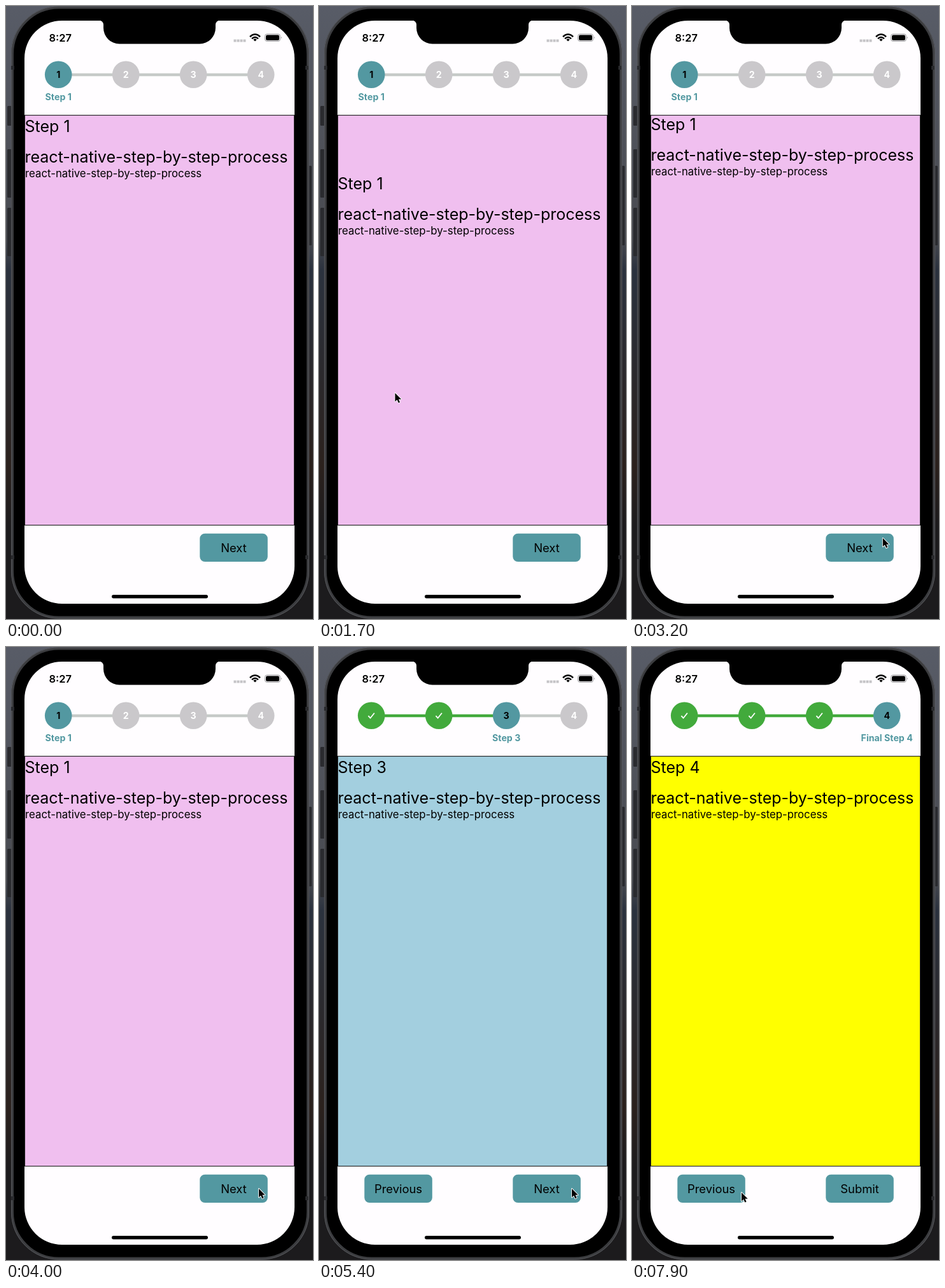
Animation of 482x963 px, one loop 8 s. Source, as an HTML page:

```html
<!DOCTYPE html>
<html lang="en">
<head>
<meta charset="utf-8">
<title>Step by step process</title>
<style>
  html, body { margin: 0; width: 100%; height: 100%; overflow: hidden; background: #1c1c20; }
  svg { display: block; width: 100vw; height: 100vh; font-family: Inter, Roboto, sans-serif; }
  .mid { text-anchor: middle; }
  .bold { font-weight: 700; font-size: 14.2px; }
  .title { font-size: 25px; }
  .small { font-size: 16.8px; }
  .button { font-size: 18.4px; }
</style>
</head>
<body>
<svg viewBox="0 0 482 963">
  <defs>
    <linearGradient id="desk" x2="0" y2="1">
      <stop offset="0" stop-color="#585c67"/>
      <stop offset=".38" stop-color="#484a50"/>
      <stop offset=".43" stop-color="#2b323e"/>
      <stop offset=".75" stop-color="#2b211d"/>
      <stop offset=".85" stop-color="#1c1b1d"/>
    </linearGradient>
    <clipPath id="panel"><rect x="30" y="172" width="422" height="643"/></clipPath>
  </defs>

  <rect width="482" height="963" fill="url(#desk)"/>
  <g fill="#2a2b2f">
    <rect x="2" y="157" width="7" height="31" rx="1.5"/>
    <rect x="2" y="225" width="7" height="76" rx="1.5"/>
    <rect x="2" y="317" width="7" height="76" rx="1.5"/>
    <rect x="474" y="251" width="6" height="125" rx="1.5"/>
  </g>
  <rect x="10" y="2.5" width="464" height="958" rx="73" stroke="#3b3c3f" stroke-width="4"/>
  <rect x="8.5" y="1" width="467" height="961" rx="74" fill="none" stroke="#55565a"/>
  <path d="M8 97h5M470 97h5M8 866h5M470 866h5" stroke="#292a2d" stroke-width="6"/>
  <rect x="29" y="23" width="424" height="916" rx="59" fill="#fffdff"/>
  <path d="M146 22.5a7 7 0 0 1 7 7V34.5a25 25 0 0 0 25 25H304a25 25 0 0 0 25 -25V29.5a7 7 0 0 1 7 -7Z"/>

  <text x="67.5" y="56" font-size="16.5" font-weight="600">8:27</text>
  <path d="M357.5 54.5h19" stroke="#c4c3c6" stroke-width="4" stroke-dasharray="4 1"/>
  <g fill="none" stroke="#000" stroke-width="2.5">
    <path d="M383 48.3Q391 40.8 399 48.3M386 51.3Q391 46.7 396 51.3"/>
    <path d="M388.3 52.7Q391 50.5 393.7 52.7L391 55.6Z" fill="#000" stroke="none"/>
  </g>
  <rect x="406.5" y="44" width="24" height="11.5" rx="3.5" fill="none" stroke="#9b9a9d"/>
  <rect x="408" y="45.5" width="21" height="8.5" rx="2.2"/>
  <path d="M432 48q2 1.7 0 3.5z" fill="#9b9a9d"/>

  <g id="steps"></g>

  <rect id="box" x="29.5" y="171.6" width="423" height="644" stroke="#1c1c1c" stroke-width="1.1"/>
  <g clip-path="url(#panel)">
    <g id="content">
      <text id="heading" class="title" x="29.5" y="198"></text>
      <text class="title" x="29.5" y="246">react-native-step-by-step-process</text>
      <text class="small" x="30" y="269.3">react-native-step-by-step-process</text>
    </g>
  </g>

  <g id="previous" class="button mid">
    <rect x="71.3" y="828.7" width="106.5" height="44.3" rx="8" fill="#5398a1"/>
    <text x="124.5" y="858">Previous</text>
  </g>
  <g id="next" class="button mid">
    <rect x="304.3" y="828.7" width="106.5" height="44.3" rx="8" fill="#5398a1"/>
    <text id="nextLabel" x="357.5" y="858"></text>
  </g>
  <rect x="166" y="925" width="151" height="5.5" rx="2.7"/>
  <path id="cursor" d="M0 0V13.5L3.1 10.7L5.3 15.5L7.6 14.5L5.5 9.8H9.7Z"
        stroke="#fff" stroke-width="1.8" stroke-linejoin="round" paint-order="stroke"/>
</svg>
<script>
const LOOP = 8000, TICK = 100;
const TEAL = '#5398a1', GREEN = '#42aa3c', GRAY = '#cac8cb';
const PANEL_COLORS = ['#f0bfef', '#86ea86', '#a3cfdf', '#ffff00'];
const STEP_CHANGES = [4700, 5200, 6700];

const PANEL_HEIGHT = 644, GRAB_TIME = 1000, RELEASE_TIME = 2700, SETTLE = 355;
const ENTRY = { time: 300, x: 30, y: 330 };
const GRAB = { x: 104, y: 421, from: 300, to: 700 };
const LEGS = [
  GRAB,
  { x: 126, y: 687, from: GRAB_TIME, to: 2400, power: 1.75 },
  { x: 300, y: 395, from: 2400, to: RELEASE_TIME },
  { x: 397, y: 851, from: RELEASE_TIME, to: 3600, power: 4.2 },
  { x: 399, y: 854, from: 6100, to: 6200 },
  { x: 160, y: 861, from: 7400, to: 7800 },
  { x: 172, y: 857, from: 7800, to: 7900 }
];

const $ = id => document.getElementById(id);
const show = (node, on) => node.setAttribute('visibility', on ? 'visible' : 'hidden');
const progress = (t, from, to) => Math.min(1, Math.max(0, (t - from) / (to - from)));
const easeOut = (k, power = 2) => 1 - (1 - k) ** power;

function cursorAt(t) {
  return LEGS.reduce((pos, leg) => {
    const k = easeOut(progress(t, leg.from, leg.to), leg.power);
    return { x: pos.x + (leg.x - pos.x) * k, y: pos.y + (leg.y - pos.y) * k };
  }, ENTRY);
}

// Overscroll resists the drag, then decays after release.
function scrollAt(t) {
  if (t < GRAB_TIME) return 0;
  const pull = cursorAt(Math.min(t, RELEASE_TIME)).y - GRAB.y;
  const offset = pull / (1 / 0.56 + Math.abs(pull) / PANEL_HEIGHT);
  return offset * Math.exp(-Math.max(0, t - RELEASE_TIME) / SETTLE);
}

const pressAt = t => progress(t, 6300, 6500) - progress(t, 6600, 7000);

function add(parent, name, attrs, text = '') {
  const node = document.createElementNS('http://www.w3.org/2000/svg', name);
  for (const key in attrs) node.setAttribute(key, attrs[key]);
  node.textContent = text;
  return parent.appendChild(node);
}

const steps = PANEL_COLORS.map((_, i) => {
  const x = 82.2 + 106 * i, root = $('steps');
  return {
    line: i < 3 && add(root, 'path', { d: `M${x + 20} 108h66`, 'stroke-width': 4.3 }),
    disc: add(root, 'circle', { cx: x, cy: 107.8, r: 21.3 }),
    number: add(root, 'text', { x, y: 112.6, class: 'bold mid' }, i + 1),
    check: add(root, 'path', {
      d: `M${x - 4.8} 108.2l3.2 3.5l6.3 -8`, fill: 'none', stroke: '#fff', 'stroke-width': 1.8
    }),
    label: add(root, 'text', { x, y: 148, class: 'bold mid', fill: TEAL },
      `${i === 3 ? 'Final ' : ''}Step ${i + 1}`)
  };
});

function draw(t) {
  const active = STEP_CHANGES.filter(time => t >= time).length;
  steps.forEach(({ line, disc, number, check, label }, i) => {
    const done = i < active, current = i === active;
    if (line) line.setAttribute('stroke', done ? GREEN : '#c6cac8');
    disc.setAttribute('fill', done ? GREEN : current ? TEAL : GRAY);
    number.setAttribute('fill', current ? '#000' : '#fff');
    show(number, !done);
    show(check, done);
    show(label, current);
  });

  $('box').setAttribute('fill', PANEL_COLORS[active]);
  $('heading').textContent = `Step ${active + 1}`;
  $('content').setAttribute('transform', `translate(0 ${scrollAt(t)})`);
  $('nextLabel').textContent = active === 3 ? 'Submit' : 'Next';
  $('next').setAttribute('opacity', 1 - 0.8 * pressAt(t));
  show($('previous'), active > 0);

  const { x, y } = cursorAt(t);
  show($('cursor'), t >= ENTRY.time);
  $('cursor').setAttribute('transform', `translate(${x} ${y})`);
}

const start = performance.now();
function frame() {
  const t = (performance.now() - start) % LOOP;
  draw(Math.floor(t / TICK) * TICK);
  requestAnimationFrame(frame);
}
frame();
</script>
</body>
</html>
```
